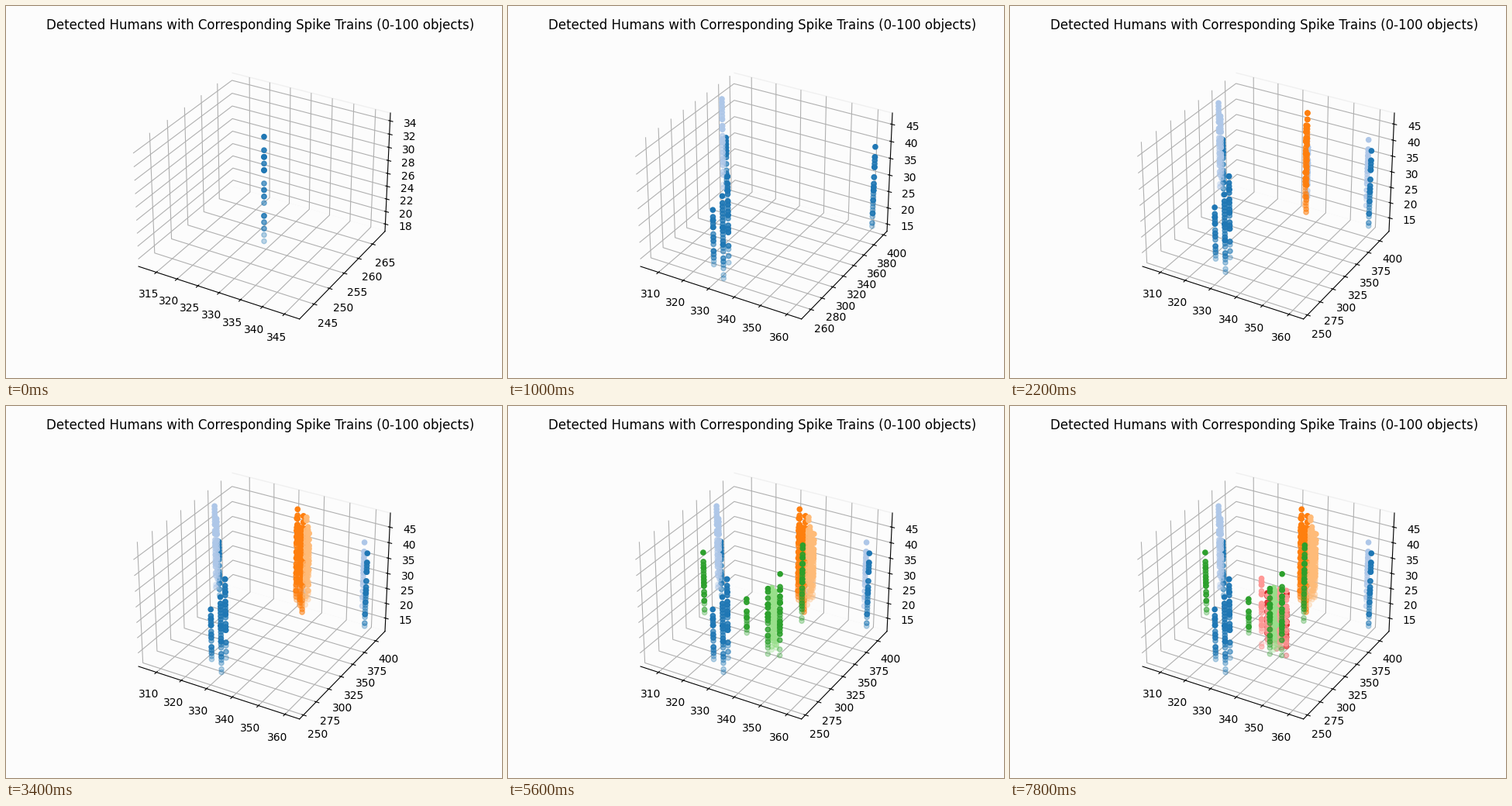
These frames come from a looping animation (640 px wide and 480 px high, 8000 ms). A matplotlib script:

```python
import matplotlib.pyplot as plt
import numpy as np
from matplotlib.animation import FuncAnimation

COUNT, STEP, PER_COLOR = 40, 200, 5
BACK = "#fcfcfc"
TITLE = "Detected Humans with Corresponding Spike Trains (0-100 objects)"
PALETTE = plt.get_cmap("tab20").colors

plt.rcParams.update({"figure.facecolor": BACK, "axes.facecolor": BACK})
rng = np.random.default_rng(7)
objects = []


def train(lo, hi):
    """Whole-number spike times, densest in the middle, reaching both ends."""
    inner = lo + (hi - lo) * rng.beta(1.5, 1.6, int(1.4 * (hi - lo)))
    return np.concatenate([[lo, hi], np.round(inner)])


def detect(x, y, lo=17, hi=37, n=1, width=0):
    """Add n columns side by side; the first one has the full height."""
    for k, dx in enumerate(np.linspace(0, width, n)):
        if k:
            z = train(lo + rng.integers(1, 4), hi - rng.integers(1, 6))
        else:
            z = train(lo, hi)
        color = PALETTE[len(objects) // PER_COLOR]
        objects.append((x + dx, y + abs(dx) / 4, z, color))


# People at the edges of the scene
detect(329.5, 255, 18, 34)
detect(333.5, 253.9, 15, 39)
detect(333.2, 264, 18, 43)
detect(308.5, 367.2, 17, 35)
detect(361.4, 397, 15, 39)
detect(306.7, 368.7, 19, 46, n=2, width=0.7)
detect(358, 409.8, 19, 40)

# Crowd at the back
detect(335.8, 401, n=2, width=0.4)
detect(336, 399.8, 13, 45, n=3, width=-1)
detect(334, 398, 17, 47, n=2, width=-0.3)
detect(337.4, 399, 16, 45, n=5, width=2.1)

# Lone people in the middle
detect(308.6, 333.8, 16, 36)
detect(332.5, 302.3, 20, 31)
detect(342.5, 293.6, 17, 38)
detect(340.1, 373.4, 15, 40)

# Crowd at the front
detect(346.4, 297, 17, 43)
detect(342.3, 302, n=5, width=2.3)
detect(346.8, 303.9, 16, 36, n=5, width=-7.8)
detect(337.8, 301, 17, 39, n=5, width=9)

fig = plt.figure(figsize=(6.4, 4.8), dpi=100)
ax = fig.add_subplot(projection="3d")
fig.text(0.5125, 0.938, TITLE, ha="center", size=12)


def reset():
    ax.cla()
    for axis in (ax.xaxis, ax.yaxis, ax.zaxis):
        axis.set_pane_color((0.988, 0.988, 0.988, 1))
    ax.yaxis.pane.set_edgecolor("#f0f0f0")
    return []


def trim_ticks(axis):
    """Keep ticks out of the thin margin at both ends of the axis."""
    lo, hi = axis.get_view_interval()
    margin = (hi - lo) / 50
    lo, hi = lo + margin, hi - margin
    ticks = axis.get_major_locator().tick_values(lo, hi)
    axis.set_ticks([t for t in ticks if lo <= t <= hi])


def update(i):
    reset()
    for x, y, z, color in objects[:i + 1]:
        ax.scatter(np.full(z.size, x), np.full(z.size, y), z, color=color)
    for axis in (ax.xaxis, ax.yaxis, ax.zaxis):
        trim_ticks(axis)
    return []


anim = FuncAnimation(fig, update, frames=COUNT, interval=STEP,
                     init_func=reset, repeat=True, repeat_delay=0)
plt.show()
```
